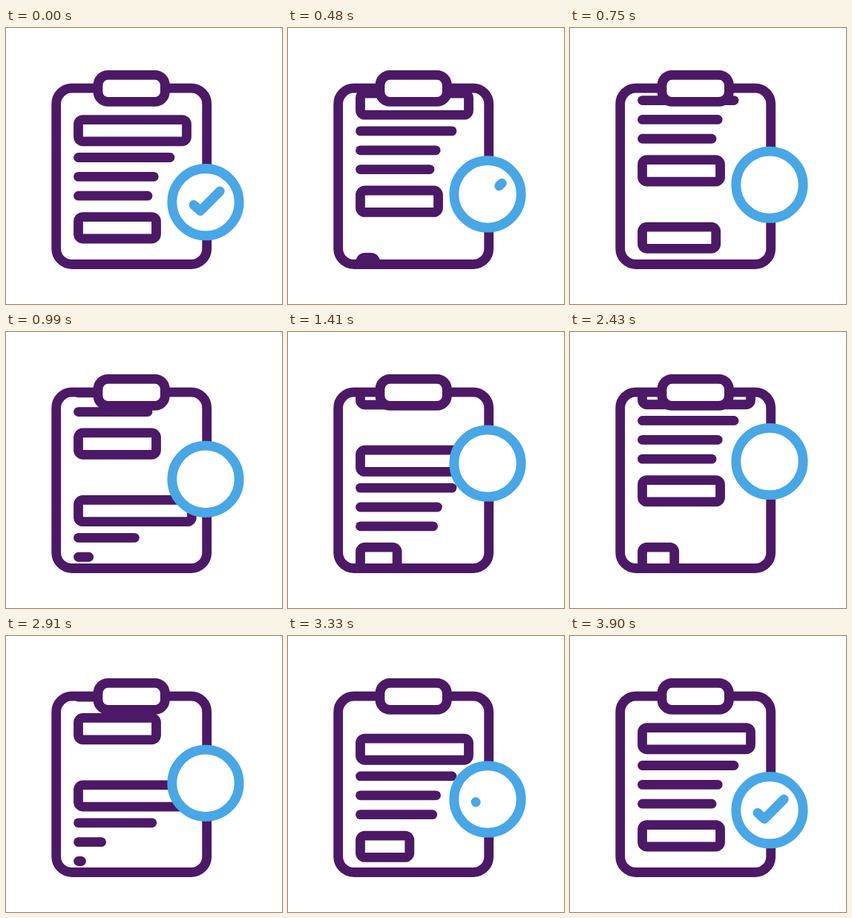
Recreate the animation shown at these times as an HTML page. Size 372 by 372 pixels, loop 3.93 s.

```html
<!DOCTYPE html>
<html lang="en">
<head>
<meta charset="utf-8">
<title>Checklist</title>
<style>
  html, body { margin: 0; width: 100%; height: 100%; overflow: hidden; background: #fff; }
  svg { display: block; width: 100vw; height: 100vh; }
  .ink { stroke: #4c1966; }
  .sky { stroke: #48a7e7; }
  svg * { stroke-width: 12.8; stroke-linecap: round; stroke-linejoin: round; }
</style>
</head>
<body>
<svg viewBox="0 0 372 372" fill="none">
  <clipPath id="page"><rect x="74" y="86" width="191" height="228"/></clipPath>
  <g id="lists" class="ink" clip-path="url(#page)"></g>
  <rect class="ink" x="67.7" y="81.2" width="203" height="237.3" rx="21"/>
  <rect class="ink" x="124" y="63.4" width="90.3" height="36" rx="13.5" fill="#fff"/>
  <g id="badge">
    <circle class="sky" cx="269" cy="0" r="45.2" fill="#fff"/>
    <path id="tick" class="sky" d="M253 3.7L262 11.8L288.3 -14.7" pathLength="1"/>
  </g>
</svg>
<script>
const STEP = 30, STEPS = 131, HALF = 65;
const LEFT = 97.5, PITCH = 221.5, STROKE = 12.8;

// Scroll passes, in steps
const PASSES = [{ start: 0, length: 63 }, { start: 62.2, length: 57.8 }];

// Growth of each row, in steps after its pass begins
const ROWS = [
  { y: 123.6, w: 146, h: 29.2, start: 8.1, grow: 28, settle: 10, peak: 1.08 },
  { y: 174.5, w: 123.5, start: 25.2, grow: 14, settle: 6, peak: 1.05 },
  { y: 200.4, w: 101.7, start: 29.8, grow: 14, settle: 6, peak: 1.05 },
  { y: 226.2, w: 93.5, start: 33.1, grow: 14, settle: 6, peak: 1.05 },
  { y: 254.6, w: 105, h: 29.4, start: 37, grow: 20, settle: 9, peak: 1.06 }
];

const clamp = v => Math.min(1, Math.max(0, v));
const ease = v => { const s = clamp(v); return s * s * (3 - 2 * s); };
const byId = id => document.getElementById(id);

function add(parent, tag, attrs = {}) {
  const el = document.createElementNS("http://www.w3.org/2000/svg", tag);
  for (const key in attrs) el.setAttribute(key, attrs[key]);
  return parent.appendChild(el);
}

function makeList() {
  const group = add(byId("lists"), "g");
  const rows = ROWS.map(r => r.h
    ? add(group, "rect", { x: LEFT, y: r.y, width: r.w, height: r.h, rx: 6 })
    : add(group, "line", { x1: LEFT, x2: LEFT + r.w, y1: r.y, y2: r.y }));
  return { group, rows };
}

function growth(row, time) {
  const t = time - row.start;
  return row.peak * ease(t / row.grow) - (row.peak - 1) * ease((t - row.grow) / row.settle);
}

function drawRow(el, row, p) {
  el.style.display = p > 0 ? "" : "none";
  if (row.h) {
    const w = Math.max(0.1, (row.w + STROKE) * p - STROKE);
    el.setAttribute("width", w);
    el.setAttribute("rx", Math.min(6, w / 2));
  } else {
    el.setAttribute("x2", LEFT + Math.max(0.01, row.w * p));
  }
}

const lists = [makeList(), makeList(), makeList()];

function draw(k) {
  const scroll = PASSES.reduce((sum, p) => sum + ease((k - p.start) / p.length), 0);
  lists.forEach(({ group, rows }, i) => {
    group.setAttribute("transform", `translate(0 ${(i - scroll) * PITCH})`);
    if (i) rows.forEach((el, j) => drawRow(el, ROWS[j], growth(ROWS[j], k - PASSES[i - 1].start)));
  });

  const rise = ease(k / HALF) - ease((k - HALF) / HALF);
  byId("badge").setAttribute("transform", `translate(0 ${234.7 - 71 * rise})`);

  const tick = byId("tick");
  const from = k < HALF ? ease(k / 20) : 0;
  const to = k < HALF ? 1 : ease((k - 110) / 20);
  tick.style.display = to - from > 0.001 ? "" : "none";
  tick.setAttribute("stroke-dasharray", `${to - from} 2`);
  tick.setAttribute("stroke-dashoffset", -from);
}

const origin = performance.now();
function frame() {
  draw(Math.floor((performance.now() - origin) / STEP) % STEPS);
  requestAnimationFrame(frame);
}
frame();
</script>
</body>
</html>
```
